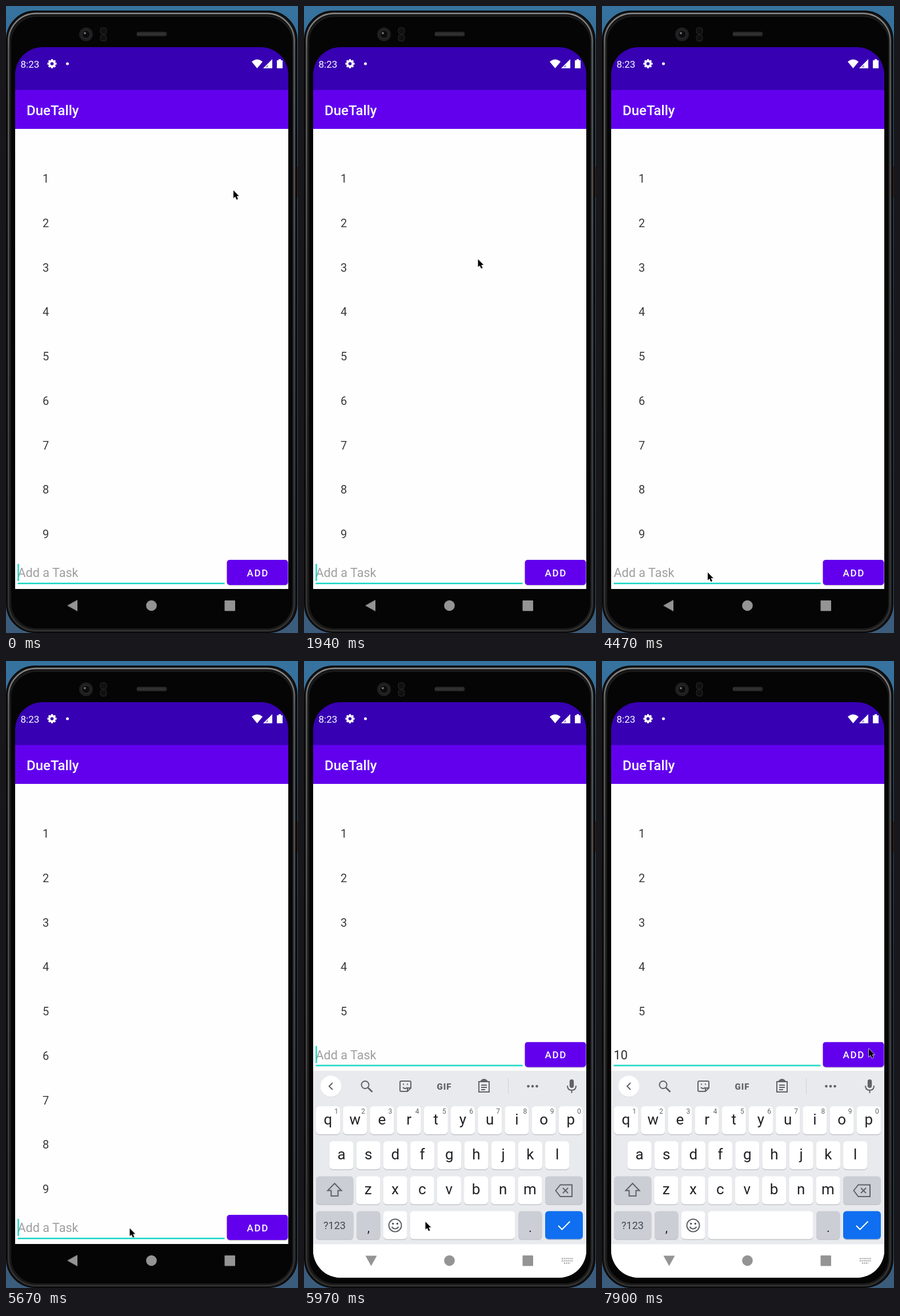
An HTML page that plays this animation: 511x1097 px, repeating every 8 s.

```html
<!DOCTYPE html>
<html lang="en">
<head>
<meta charset="utf-8">
<title>Task list on a phone</title>
<style>
html, body { margin: 0; width: 100%; height: 100%; overflow: hidden; background: #000; }
svg { display: block; width: 100vw; height: 100vh; }
text { font-family: Roboto, sans-serif; }
.mid { text-anchor: middle; }
.line { fill: none; stroke: #5f6368; stroke-width: 2; }
</style>
</head>
<body>
<svg viewBox="0 0 511 1097" xmlns="http://www.w3.org/2000/svg">
  <defs>
    <linearGradient id="sky" x2="0" y2="1">
      <stop stop-color="#37739f"/><stop offset=".5" stop-color="#28567d"/><stop offset="1" stop-color="#3c5c7c"/>
    </linearGradient>
    <linearGradient id="rim" x2="0" y2="1">
      <stop stop-color="#8a8a8a"/><stop offset=".06" stop-color="#606060"/><stop offset="1" stop-color="#333"/>
    </linearGradient>
    <clipPath id="glass"><rect x="16" y="72" width="478" height="1007" rx="48"/></clipPath>
  </defs>

  <!-- Phone body -->
  <rect width="511" height="1097" fill="url(#sky)"/>
  <rect x="508" y="281" width="3" height="54" fill="#5a2a26"/>
  <rect x="1" y="9" width="508" height="1087" rx="50" fill="#151515" stroke="#090909" stroke-width="2"/>
  <rect x="4.5" y="13" width="500" height="1080" rx="48" fill="#151515" stroke="url(#rim)" stroke-width="2.5"/>
  <rect x="8" y="18" width="494" height="1072" rx="46" fill="#050505" stroke="#1b1b1b" stroke-width="2"/>
  <circle cx="140" cy="49.500" r="12" fill="#1f1f1f"/>
  <circle cx="140" cy="49.500" r="7" fill="#0b0c0e" stroke="#343434"/>
  <circle cx="138" cy="47.500" r="2" fill="#6c7074"/>
  <g fill="#101010" stroke="#292929">
    <rect x="165" y="38" width="11" height="11" rx="4"/>
    <rect x="165" y="50.500" width="11" height="11" rx="4"/>
  </g>
  <rect x="228.500" y="45" width="53" height="8" rx="3.500" fill="#242424"/>
  <path d="M230 49H280" stroke="#434343" stroke-width="4" stroke-dasharray="1 1.500"/>

  <g clip-path="url(#glass)">
    <rect x="16" y="215" width="478" height="805" fill="#fefefe"/>
    <rect x="16" y="72" width="478" height="75" fill="#3700b3"/>
    <rect x="16" y="147" width="478" height="68" fill="#6200ee"/>

    <!-- Status bar -->
    <g fill="#fff">
      <text x="25.500" y="108" font-size="17">8:23</text>
      <circle cx="80.500" cy="101" r="4.600" fill="none" stroke="#fff" stroke-width="3.600"/>
      <g id="teeth"></g>
      <circle cx="107.500" cy="101" r="2.500"/>
      <path d="M430 97.500Q439.500 89.500 449 97.500L439.500 109Z"/>
      <path d="M466 93V109H450Z"/>
      <path d="M458.500 102.500V107.500H453.500Z" fill="#3700b3" opacity=".45"/>
      <path d="M477 93h4v2h3v14h-10v-14h3z"/>
      <text x="36" y="190.500" font-size="24" font-weight="500">DueTally</text>
    </g>

    <g id="tasks" font-size="20" fill="#3a3a3a"></g>

    <!-- Task entry -->
    <g id="entry">
      <text id="hint" x="20.500" y="999" font-size="21.600" fill="#9f9f9f">Add a Task</text>
      <g font-size="21.600" fill="#2b2b2b">
        <text id="one" x="20.500" y="999">1</text>
        <text id="zero" x="32.700" y="999">0</text>
      </g>
      <rect x="20.500" y="1009" width="362" height="2.500" fill="#16d6c4"/>
      <rect id="caret" x="20.300" y="976" width="2.400" height="30" fill="#16d6c4"/>
      <rect x="387" y="970.500" width="106.500" height="44" rx="5" fill="#000" opacity=".18"/>
      <rect x="386.500" y="969" width="107" height="44" rx="5" fill="#6200ee"/>
      <text x="421.500" y="997.500" font-size="17" font-weight="500" letter-spacing="1.700" fill="#fff">ADD</text>
    </g>

    <!-- Keyboard -->
    <g id="keyboard">
      <rect x="16" y="717" width="478" height="390" fill="#e8eaed"/>
      <circle cx="47" cy="744.500" r="18.500" fill="#c9cbd0"/>
      <circle cx="47" cy="744" r="18.500" fill="#fff"/>
      <g class="line">
        <path d="M50 738L44 744L50 750"/>
        <circle cx="107" cy="741.500" r="6.500"/><path d="M112 746.500L119.500 754" stroke-width="2.600"/>
        <path d="M170 735h15q2 0 2 2v10l-6 6h-11q-2 0-2-2v-14q0-2 2-2zM187 747h-4q-2 0-2 2v4M173 746q4 4 8 0M173 740.500h2M180 740.500h2"/>
        <path d="M306 736h18v18h-18z"/><path d="M310 742h10M310 746h10M310 750h7"/>
        <path d="M310 736q5-6 10 0" stroke-width="4"/>
        <path d="M357.500 730V757" stroke="#d0d2d6" stroke-width="1"/>
        <path d="M461 743q0 8 7.500 8t7.500-8M468.500 751v5"/>
      </g>
      <g fill="#5f6368">
        <text class="mid" x="245.500" y="749.500" font-size="15" font-weight="900" letter-spacing="1">GIF</text>
        <circle cx="392.500" cy="744" r="2.300"/><circle cx="400" cy="744" r="2.300"/><circle cx="407.500" cy="744" r="2.300"/>
        <rect x="464.800" y="732" width="7.400" height="15" rx="3.700"/>
      </g>
      <g id="keys"></g>
      <g class="line" stroke="#4a4d51">
        <path d="M53.500 914L65.500 926.500H59.500V936H47.500V926.500H41.500Z"/>
        <path d="M440.500 926.500L448.500 916.500H469V937H448.500ZM453 922l9 9M462 922l-9 9"/>
        <circle cx="159.500" cy="987.500" r="11"/><path d="M153.500 990q6 7 12 0"/>
        <path d="M445 988L451.500 994.500L465.500 980.500" style="stroke:#fff"/>
      </g>
      <circle cx="155.700" cy="984.500" r="1.700" fill="#4a4d51"/><circle cx="163.300" cy="984.500" r="1.700" fill="#4a4d51"/>
    </g>

    <!-- Navigation bar -->
    <rect id="nav" x="16" y="1020.500" width="478" height="59"/>
    <g fill="#949494">
      <g transform="translate(117 1048.500)"><path id="back" d="M-10 .5L8-9.500V10.500Z"/></g>
      <circle cx="254.500" cy="1049" r="9.300"/>
      <rect x="382.500" y="1040" width="18.500" height="18.500" rx="1"/>
      <path id="switcher" d="M451 1045.500h19M451 1049.500h19M455 1053.500h11" stroke="#949494" stroke-width="2" stroke-dasharray="2 1.400"/>
    </g>
  </g>

  <path id="cursor" d="M0 0V13.800L3.100 11L5.500 16.300L8 15.200L5.700 10.100H9.800Z" stroke="#fff" stroke-width="1.200" paint-order="stroke"/>
</svg>

<script>
const LOOP = 8000, RISE = 5820, OPEN = 5970;
const byId = id => document.getElementById(id);

function add(parent, tag, attrs, label) {
  const node = document.createElementNS("http://www.w3.org/2000/svg", tag);
  for (const name in attrs) node.setAttribute(name, attrs[name]);
  if (label) node.textContent = label;
  return byId(parent).appendChild(node);
}

// Rows are [time, styles]; every value holds until the next row.
function hold(node, rows) {
  const frames = rows.map(([time, style]) => ({ offset: time / LOOP, easing: "step-end", ...style }));
  frames.push({ ...rows.at(-1)[1], offset: 1 });
  node.animate(frames, { duration: LOOP, iterations: Infinity });
}

const move = (x, y) => ({ transform: `translate(${x}px, ${y}px)` });
const show = (node, rows) => hold(node, rows.map(([time, opacity]) => [time, { opacity }]));

for (let i = 0; i < 8; i++) {
  add("teeth", "rect", { x: 78.8, y: 93, width: 3.4, height: 4, transform: `rotate(${i * 45} 80.5 101)` });
}

for (let i = 0; i < 9; i++) {
  const task = add("tasks", "text", { x: 64, y: 309 + i * 77.75 }, String(i + 1));
  if (i > 4) show(task, [[0, 1], [RISE, 0]]);
}

function key(x, y, width, fill = "#fff") {
  add("keys", "rect", { x, y: y + 1.5, width, height: 49, rx: 6, fill: "#c3c5ca" });
  add("keys", "rect", { x, y, width, height: 49, rx: 6, fill });
}

function label(x, y, size, text, fill = "#202124") {
  add("keys", "text", { x, y, "font-size": size, fill, class: "mid" }, text);
}

[["qwertyuiop", 42], ["asdfghjkl", 65.5], ["zxcvbnm", 112.3]].forEach(([letters, left], row) => {
  const top = 779 + row * 61.2;
  [...letters].forEach((letter, i) => {
    const x = left + i * 47.2;
    key(x - 21, top, 42);
    label(x, top + 32, 26, letter);
    if (row === 0) label(x + 14.5, top + 13, 12, String((i + 1) % 10), "#5f6368");
  });
});

const GREY = "#cbced4";
key(21, 901.4, 65.5, GREY);
key(422, 901.4, 66, GREY);
key(21, 962.5, 65.5, GREY);
key(92, 962.5, 41.5, GREY);
key(139, 962.5, 41.5);
key(185.5, 962.5, 184);
key(375, 962.5, 41.5, GREY);
key(422, 962.5, 66, "#0f6ff0");
label(53.5, 994, 18, "?123", "#44474b");
label(113, 999, 22, ",");
label(396, 999, 22, ".");

hold(byId("entry"), [[0, move(0, 0)], [RISE, move(0, -302.5)]]);
hold(byId("keyboard"), [
  [0, move(0, 400)], [RISE, move(0, 83.5)], [OPEN, move(0, 0)]
]);
hold(byId("nav"), [
  [0, { fill: "#050505" }], [RISE, { fill: "rgba(0, 0, 0, 0.2)" }], [OPEN, { fill: "#ffffff" }]
]);
hold(byId("back"), [[0, { transform: "rotate(0deg)" }], [OPEN, { transform: "rotate(-90deg)" }]]);
show(byId("switcher"), [[0, 0], [RISE, 0.5], [OPEN, 1]]);

show(byId("hint"), [[0, 1], [6860, 0]]);
show(byId("one"), [[0, 0], [6860, 1]]);
show(byId("zero"), [[0, 0], [7450, 1]]);
hold(byId("caret"), [[0, move(0, 0)], [6860, move(12.2, 0)], [7450, move(24.4, 0)]]);
const blinks = [0, 440, 1040, 1490, 1940, 2540, 2980, 3430, 4020, 4470, 5070, 5520, 5670, 6110, 6710, 7300, 7450, 7900];
show(byId("caret"), blinks.map((time, i) => [time, 1 - i % 2]));

hold(byId("cursor"), [
  [0, 398, 322.5], [300, 398, 325], [440, 397.5, 330],
  [1340, 396, 332], [1490, 385, 341], [1640, 360, 363], [1790, 330, 399], [1940, 304.5, 443],
  [2090, 284, 532], [2240, 268.5, 607],
  [2390, 269, 613], [2540, 268, 621], [2690, 267, 628], [2830, 266, 632], [3280, 264.5, 631.5],
  [3430, 265, 627], [3570, 266, 614], [3720, 264, 602], [3870, 257, 642], [4020, 240, 742],
  [4170, 215, 862], [4320, 195, 950], [4470, 185, 991], [4620, 203, 992.5], [4770, 216.5, 992.5],
  [5820, 215, 992.5], [5970, 212.5, 981],
  [6110, 213, 968], [6260, 215, 950], [6410, 217, 934], [6560, 218, 924], [6710, 217.5, 922],
  [7450, 240, 900], [7600, 345, 795], [7750, 470, 673], [7900, 467, 678.5]
].map(([time, x, y]) => [time, move(x, y)]));
</script>
</body>
</html>
```
